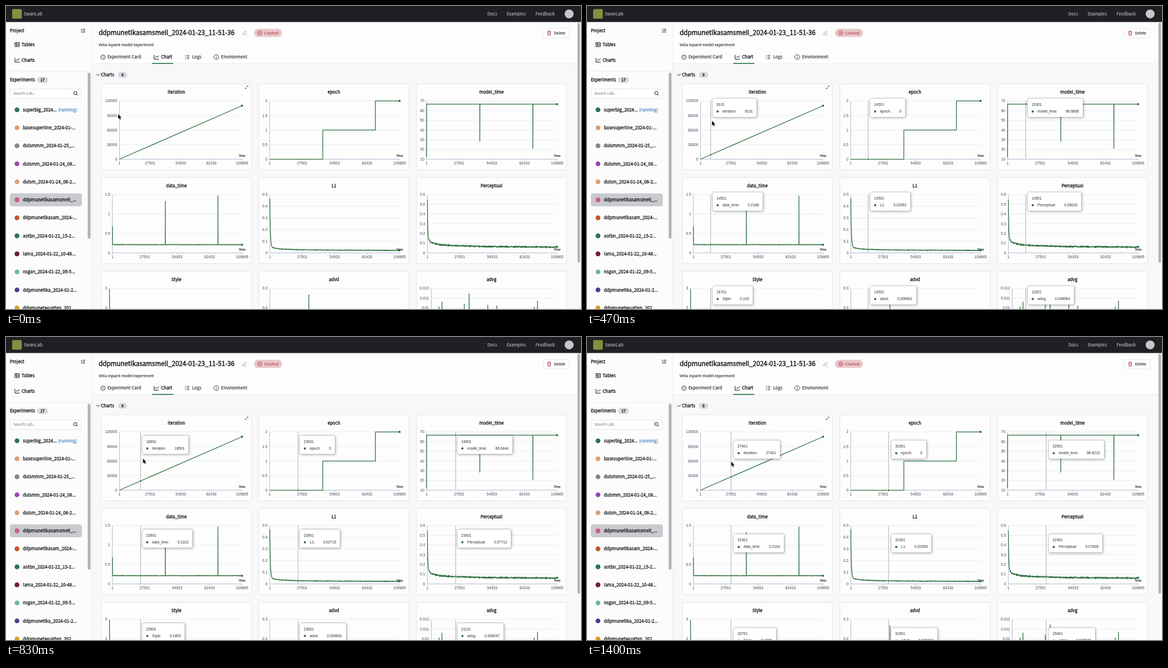
Write an HTML page that moves like this. It is 1031x543 px and loops after 1430 ms.

```html
<!DOCTYPE html>
<html lang="en">
<head>
<meta charset="utf-8">
<title>Experiment charts</title>
<style>
  html, body { margin: 0; width: 100%; height: 100%; overflow: hidden; background: #f8f8fa; }
  #stage { position: absolute; left: 0; top: 0; width: 1031px; height: 543px; overflow: hidden; }
  svg { position: absolute; left: 0; top: 0; }
  text { font: 7.75px "Noto Sans CJK SC", "Noto Sans CJK JP", "Noto Sans", sans-serif; fill: #111214; stroke: #111214; stroke-width: .08px; }
  .small { font-size: 6.8px; }
  .semi { stroke-width: .32px; }
  .head { font-size: 11.57px; stroke-width: .42px; }
  .name { font-size: 7.9px; stroke-width: .28px; }
  .axis { font: 6.7px "Liberation Sans", Arial, sans-serif; fill: #45474e; stroke: none; }
  .step { font: 5.9px "Liberation Sans", Arial, sans-serif; }
  .tip {
    position: absolute; left: 0; top: 0; height: 33px; padding: 6.5px 7px 0; box-sizing: border-box;
    font: 6.5px/8px "Liberation Sans", Arial, sans-serif; color: #2c2d31; white-space: nowrap;
    background: #fff; border-radius: 2px; box-shadow: 0 0 1.5px rgba(0,0,0,.5), 1px 1px 5px rgba(0,0,0,.32);
  }
  .tip div { display: flex; align-items: center; margin-top: 4.5px; }
  .tip i { width: 4.4px; height: 4.4px; border-radius: 50%; background: #2a6f3c; margin-right: 6.4px; }
  .tip b { font-weight: 400; margin-left: auto; padding-left: 15px; }
</style>
</head>
<body>
<div id="stage"></div>
<script>
const GREEN = '#2a6f3c', DARK = '#111214', RED = '#a83742';
const LOOP = 1430, FRAMES = 43;
const COL = 282.5, ROW = 168, TOP = 170, BOTTOM = 274.5, RIGHT = 423.2;
const LAST_STEP = 109865;

// Drawing helpers
const rect = (x, y, w, h, fill, r = 0, stroke = 'none') =>
  `<rect x="${x}" y="${y}" width="${w}" height="${h}" rx="${r}" fill="${fill}" stroke="${stroke}"/>`;
const dot = (x, y, r, fill, extra = '') => `<circle cx="${x}" cy="${y}" r="${r}" fill="${fill}" ${extra}/>`;
const path = (d, stroke = DARK, w = 1) =>
  `<path d="${d}" fill="none" stroke="${stroke}" stroke-width="${w}" stroke-linejoin="round"/>`;
const text = (x, y, s, cls = '', anchor = 'start', color = '') =>
  `<text x="${x}" y="${y}" class="${cls}" text-anchor="${anchor}"` +
  (color && ` style="fill:${color};stroke:${color}"`) + `>${s}</text>`;
const chartIcon = (x, y) =>
  path(`M${x} ${y}v7.5h8.5M${x + 2} ${y + 5}l2-2.3 1.6 1.4 2.6-3.2`, DARK, 1);

let seed = 7;
const rnd = () => (seed = (seed * 16807) % 2147483647) / 2147483647;
const SAMPLES = 800;
const noisy = (fn, amp) => Array.from({ length: SAMPLES + 1 }, (_, i) =>
  [i / SAMPLES, fn(i / SAMPLES) + (rnd() + rnd() - 1) * amp]);
const spiky = (fn, amp, spikes) => noisy(fn, amp)
  .concat(...spikes.map(([x, v]) => [[x - .001, fn(x)], [x, v], [x + .001, fn(x)]]))
  .sort((a, b) => a[0] - b[0]);

// Pointer tracks are keyed by frame index
const KEYS = [2, 8, 14, 20, 29, 34];
const STEPS = {
  iter: [601, 5601, 9101, 13101, 23601, 27401],
  main: [6501, 11201, 14501, 18401, 28301, 31901],
  model: [7301, 12001, 15301, 19101, 29001, 32501],
  style: [8901, 13501, 16701, 20501, 30201, 33701],
  advg: [3201, 8101, 11501, 15401, 25701, 29401]
};
const CURSOR = {
  at: [0, 8, 14, 20, 29, 34],
  x: [201, 217, 224, 234.5, 254.5, 258.5],
  y: [193.7, 197.7, 205.7, 213, 221.7, 223.3]
};
const TIP = {
  at: [2, 8, 14, 20, 29, 34, 38, 42],
  x: [207, 217.3, 225.2, 233, 253.4, 261.5, 262.7, 263],
  y: [166, 166, 166, 171, 181.5, 184.5, 185, 185.2]
};

const charts = [
  { name: 'iteration', left: 203.5, min: 0, max: 120000, n: 4, steps: 'iter',
    pts: [[0, 0], [1, 110000]] },
  { name: 'epoch', left: 472.8, min: 0, max: 2, n: 4, values: [0, 0, 0, 0, 0, 0], digits: 0,
    pts: [[0, 0], [.409, 0], [.409, 1], [.814, 1], [.814, 2], [1, 2]] },
  { name: 'model_time', left: 754, min: 10, max: 70, n: 6, steps: 'model', digits: 4,
    values: [66.7051, 66.6921, 66.6808, 66.6673, 66.6261, 66.6213],
    pts: spiky(x => x ? 66.6 : 12, 0, [[.408, 28.5], [.814, 21]]) },
  { name: 'data_time', left: 190.8, min: 0, max: 1.5, n: 3, digits: 4,
    values: [.2105, .211, .2168, .208, .2119, .2104],
    pts: spiky(x => x ? .213 : .68, .009, [[.408, 1.33], [.814, 1.47]]) },
  { name: 'L1', left: 473, min: 0, max: .5, n: 5, digits: 5,
    values: [.0412, .03348, .02992, .02831, .02622, .02599],
    pts: noisy(x => .0165 + .0055 / Math.sqrt(x + .012) + .4 * Math.exp(-x * 250), .004) },
  { name: 'Perceptual', left: 755.5, min: 0, max: .6, n: 6, digits: 5,
    values: [.1102, .09123, .08023, .08181, .07337, .07609],
    pts: noisy(x => .048 + .0125 / Math.sqrt(x + .01) + .37 * Math.exp(-x * 350), .011) },
  { name: 'Style', left: 185.5, min: 0, max: 3, n: 3, steps: 'style', digits: 4,
    values: [.2412, .177, .193, .1394, .2133, .1688],
    pts: noisy(x => .2 + 2.77 * Math.exp(-x * 400), .03) },
  { name: 'advd', left: 473, min: 0, max: .3, n: 3, digits: 6,
    values: [.0131, .01026, .006681, .006929, .0065, .006034],
    pts: spiky(() => .01, .003, [[.301, .268]]) },
  { name: 'advg', left: 762.5, min: .006, max: .012, n: 6, steps: 'advg', digits: 6,
    values: [.008522, .008561, .008564, .008716, .008411, .008576],
    pts: spiky(() => .0085, .0002, [[.062, .0101], [.085, .0106], [.262, .0104], [.301, .01145],
      [.449, .0103], [.521, .0102], [.818, .0101], [.844, .0107]]) }
];

charts.forEach((c, i) => {
  c.dx = (i % 3) * COL;
  c.dy = Math.floor(i / 3) * ROW;
  c.right = RIGHT + c.dx;
  c.y = v => c.dy + BOTTOM - (v - c.min) / (c.max - c.min) * (BOTTOM - TOP);
  c.x = f => c.left + f * (c.right - c.left);
});

function drawChart(c) {
  const base = c.dy + BOTTOM;
  let s = rect(171 + c.dx, 139.3 + c.dy, 269, 154.3, '#fdfdfd', 2, '#e4e5ec')
    + text(305.5 + c.dx, 157.3 + c.dy, c.name, 'semi', 'middle');
  for (let i = 0; i <= c.n; i++) {
    const v = c.min + (c.max - c.min) * i / c.n, y = c.y(v);
    if (i) s += path(`M${c.left} ${y}H${c.right}`, '#e6e8f2', .8);
    s += text(c.left - 4, y + 2.4, +v.toFixed(3), 'axis', 'end');
  }
  s += path(`M${c.left} ${c.dy + TOP}V${base}H${c.right}`, '#a9b4cf', .9);
  [1, 27501, 54933, 82433, LAST_STEP].forEach((v, i) => {
    const x = c.x(i / 4);
    s += path(`M${x} ${base}v2.8`, '#a9b4cf', .8) + text(x, base + 9.8, v, 'axis', 'middle');
  });
  s += text(c.right, base - 4.6, 'Step', 'step', 'middle');
  const d = c.pts.map(([f, v]) => c.x(f).toFixed(2) + ' ' + c.y(v).toFixed(2)).join('L');
  const end = c.pts[c.pts.length - 1];
  return s + path('M' + d, GREEN, 1.25) + dot(c.right, c.y(end[1]), 1.9, GREEN);
}

function drawTopBar() {
  return rect(0, 0, 1031, 28.7, '#1f2024')
    + rect(11, 5.5, 17.3, 17.3, '#82913f', 2)
    + [[32, 'SwanLab'], [863, 'Docs'], [897.7, 'Examples'], [949.3, 'Feedback']]
      .map(([x, s]) => text(x, 16.9, s, '', 'start', '#c0c1c5')).join('')
    + dot(1009.7, 14.2, 8, '#c6c7cb');
}

function drawSidebar() {
  const runs = [
    ['superbig_2024...', '#2a7455'], ['basesuperline_2024-01-...', '#dd9f78'],
    ['dulsmmm_2024-01-25_...', '#84858c'], ['dulsmm_2024-01-24_08...', '#9b46b0'],
    ['dulsm_2024-01-24_08-2...', '#dd9f78'], ['ddpmunetlkasamsmell_...', '#cf5c80'],
    ['ddpmunetlkasam_2024-...', '#c4562a'], ['aotbn_2024-01-22_15-2...', '#2a7455'],
    ['lama_2024-01-22_10-48...', '#6e1c40'], ['nsgan_2024-01-22_09-5...', '#70b5a6'],
    ['ddpmunetlka_2024-01-2...', '#4f3a93'], ['ddpmunetwuatten_202...', '#d9a029']
  ];
  return rect(0, 28.7, 154, 515, '#fcfcfc')
    + path('M153.7 29V543M0 117.3H153.5', '#e9e9ee', .8)
    + text(7, 46.9, 'Project', 'semi')
    + path('M137.5 41.5h4.5M137.5 44h4.5M134.5 46.7h7.5M136.5 41.2l-2 1.7 2 1.7', DARK, .9)
    + path('M16 65.5h8v7.3h-8zM16 68h8M18.7 65.5v7.3M18.7 70.4h5.3', DARK, .9)
    + text(28, 71.5, 'Tables', 'semi')
    + chartIcon(16, 93) + text(28, 99.6, 'Charts', 'semi')
    + text(7, 135.4, 'Experiments', 'semi')
    + rect(55.7, 127, 19.4, 11, '#d8d9dd', 5.5) + text(65.4, 135, '17', 'small semi', 'middle')
    + rect(7.5, 148.7, 127.5, 17, '#fff', 3, '#e2e3ea')
    + text(13, 159.2, 'Search Lab...', 'small', 'start', '#7a7b82')
    + dot(124.3, 156, 2.9, 'none', `stroke="${DARK}"`) + path('M126.4 158.2l2.3 2.3')
    + rect(7, 335.7, 129, 23.3, '#c9cace', 4)
    + runs.map(([s, fill], i) => {
        const y = 186 + i * 32.27;
        return dot(19.7, y, 4.3, fill) + text(30.2, y + 2.8, s, 'name');
      }).join('')
    + text(93.5, 188.8, '(running)', '', 'start', '#2467bd')
    + rect(146.5, 119.5, 5, 297.5, '#b2b3b8', 2.5);
}

function drawHeader() {
  return rect(154, 28.7, 869, 75, '#fdfdfd') + path('M154 103.6H1023', '#e6e6ec', .8)
    + text(166.2, 52.4, 'ddpmunetlkasamsmell_2024-01-23_11-51-36', 'head')
    + path('M424.3 51.5l.5-2.2 4.4-4.4 1.6 1.6-4.4 4.4zM428 52h3.4', '#8d8f96', .8)
    + rect(444.7, 40.8, 50.3, 14.8, '#e9c8ca', 7.4)
    + dot(455, 48.2, 3.7, 'none', `stroke="${RED}" stroke-width=".9"`)
    + path('M453.6 46.8l2.8 2.8M456.4 46.8l-2.8 2.8', RED, .9)
    + text(462.8, 50.8, 'Crashed', 'small', 'start', RED)
    + text(166.2, 71.6, 'Velia inpaint model experiment', 'small')
    + rect(963.5, 40.3, 46.5, 16.7, '#fff', 3, '#e6e7ec')
    + path('M970.5 46.2h7M972.7 46.2v-1.6h2.6v1.6M971.3 46.2l.4 6.3h4.6l.4-6.3M973.2 48v2.8M974.8 48v2.8', RED, .8)
    + text(982.6, 51.3, 'Delete', 'small')
    + dot(174, 91.7, 4, 'none', `stroke="${DARK}" stroke-width=".8"`)
    + path('M174 93l2-2.6M171.8 92.6v-1M173 89.7l1-.4', DARK, .9)
    + text(182, 94.4, 'Experiment Card')
    + chartIcon(265.6, 87.8) + text(278, 94.4, 'Chart', 'semi')
    + path('M321 88.6h1.5M324 88.6h4.6M321 91.5h1.5M324 91.5h4.6M321 94.4h1.5M324 94.4h4.6', DARK, .9)
    + text(333.7, 94.4, 'Logs')
    + dot(377, 91.6, 4.3, 'none', `stroke="${DARK}" stroke-width=".8"`)
    + path('M377 91v3M377 88.8v1', DARK, .9) + text(385.7, 94.4, 'Environment')
    + rect(262, 102, 38, 1.7, '#2f7a4a')
    + path('M162 121.8l2.9 2.9 2.9-2.9') + text(170.3, 125.8, 'Charts', 'semi')
    + rect(200.7, 118, 16.5, 10.4, '#d8d9dd', 5.2) + text(209, 125.7, '9', 'small semi', 'middle');
}

const stage = document.getElementById('stage');
stage.innerHTML = '<svg width="1031" height="543" viewBox="0 0 1031 543">'
  + rect(0, 0, 1031, 543, '#f8f8fa') + drawHeader() + charts.map(drawChart).join('')
  + path('M429.2 148l1.7-1.7M432 145.2l1.7-1.7M429 146.6v1.6h1.6M432.3 143.3h1.6v1.6', DARK, .75)
  + rect(1023, 28.7, 8, 515, '#f9f9fa') + rect(1024.7, 30, 4.6, 430, '#b2b3b8', 2.3)
  + drawSidebar() + drawTopBar()
  + '<g id="marks">' + charts.map(c =>
      `<g>${path(`M0 ${c.dy + TOP}V${c.dy + BOTTOM}`, '#a5a7b0', .9)}${dot(0, 0, 2, GREEN, 'stroke="#fff" stroke-width=".8"')}</g>`).join('')
  + '</g></svg>'
  + charts.map(c => `<div class="tip"><span></span><div><i></i>${c.name}:<b></b></div></div>`).join('')
  + '<svg width="1031" height="543"><path id="cursor" fill="#111" stroke="#fff" stroke-width=".8" '
  + 'paint-order="stroke" d="M0 0V8.6L2 6.8L3.4 10L4.8 9.4L3.4 6.3H6.2Z"/></svg>';

const marks = document.getElementById('marks');
const cursor = document.getElementById('cursor');
const tips = stage.querySelectorAll('.tip');
charts.forEach((c, i) => {
  c.mark = marks.children[i];
  c.point = c.mark.querySelector('circle');
  c.tip = tips[i];
  c.stepOut = c.tip.querySelector('span');
  c.valueOut = c.tip.querySelector('b');
});

function track(at, vals, f) {
  if (f <= at[0]) return vals[0];
  for (let i = 1; i < at.length; i++) {
    if (f <= at[i]) {
      return vals[i - 1] + (vals[i] - vals[i - 1]) * (f - at[i - 1]) / (at[i] - at[i - 1]);
    }
  }
  return vals[vals.length - 1];
}
const stepAt = (kind, f) => Math.round((track(KEYS, STEPS[kind], f) - 1) / 100) * 100 + 1;

function render(ms) {
  const f = Math.floor(ms * FRAMES / LOOP + .1);
  const shown = f >= KEYS[0];
  const fade = Math.min(1, (f - 1) / 4);
  const tipX = track(TIP.at, TIP.x, f), tipY = track(TIP.at, TIP.y, f);
  const lineX = charts[0].x(stepAt('iter', f) / LAST_STEP);

  cursor.setAttribute('transform',
    `translate(${track(CURSOR.at, CURSOR.x, f)} ${track(CURSOR.at, CURSOR.y, f)})`);
  marks.style.display = shown ? '' : 'none';
  for (const c of charts) {
    c.tip.style.display = shown ? '' : 'none';
    if (!shown) continue;
    const step = stepAt(c.steps || 'main', f);
    const value = c.values ? +track(KEYS, c.values, f).toFixed(c.digits) : step;
    c.mark.setAttribute('transform', `translate(${lineX + c.dx} 0)`);
    c.point.setAttribute('cy', c.y(value));
    c.tip.style.opacity = fade;
    c.tip.style.transform = `translate(${tipX + c.dx}px, ${tipY + c.dy}px)`;
    c.stepOut.textContent = step;
    c.valueOut.textContent = value;
  }
}

const start = performance.now();
function tick() {
  render((performance.now() - start) % LOOP);
  requestAnimationFrame(tick);
}
tick();
</script>
</body>
</html>
```
